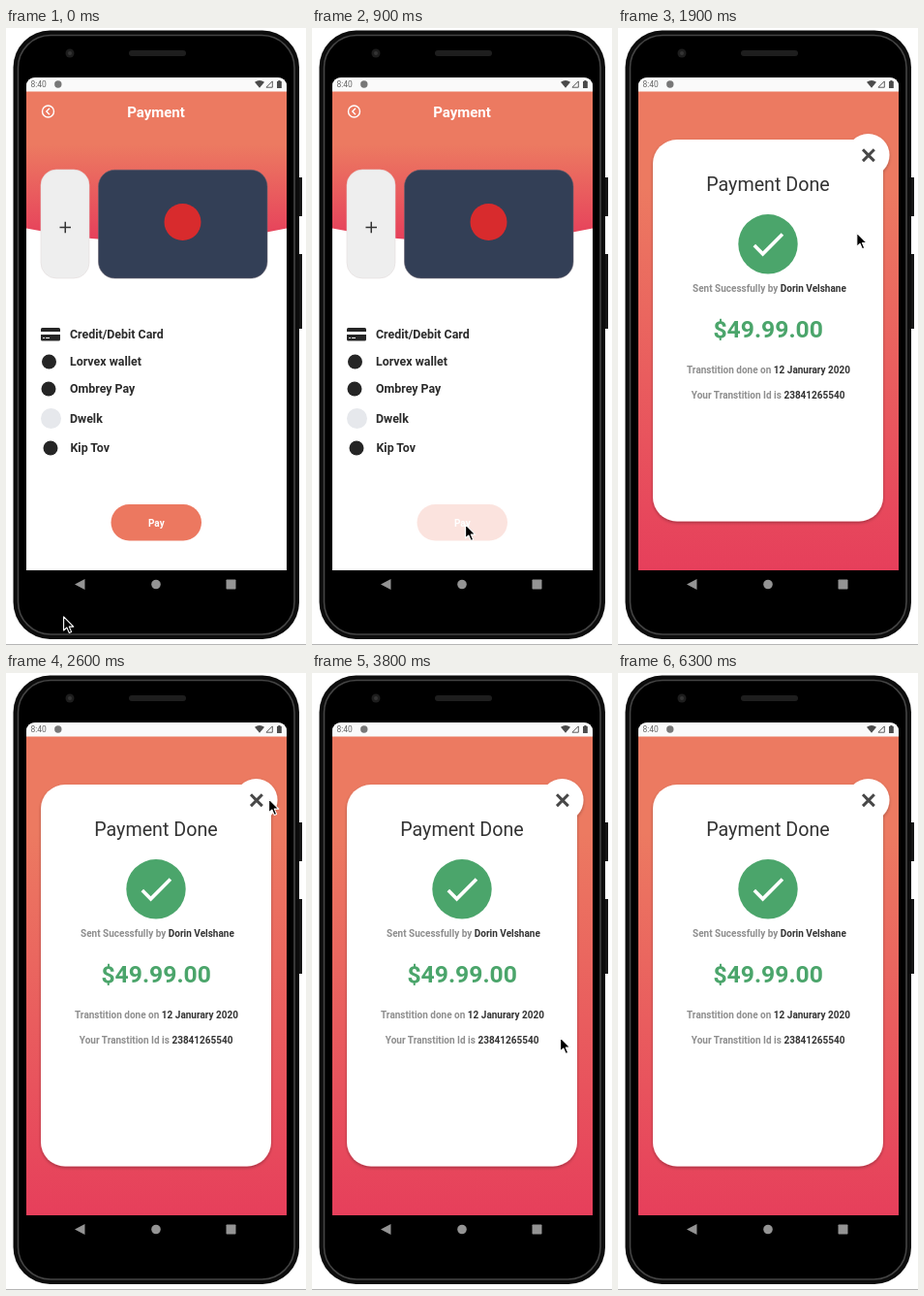
These frames come from a looping animation (310 px wide and 636 px high, 6400 ms). An HTML page:

```html
<!DOCTYPE html>
<html lang="en">
<head>
<meta charset="utf-8">
<title>Payment flow</title>
<style>
  html, body { margin: 0; width: 100%; height: 100%; overflow: hidden; background: #fff; }
  svg { display: block; width: 310px; height: 636px; }
  text { font-family: Roboto, sans-serif; font-weight: 700; fill: #2b2b2b; white-space: pre; }
  .mid { text-anchor: middle; }
  .method { font-size: 12.4px; }
  .note { font-size: 10px; fill: #8e8e8e; }
  .note tspan { fill: #333; }
</style>
</head>
<body>
<svg viewBox="0 0 310 636">
  <defs>
    <linearGradient id="header" x1="0" y1="65" x2="0" y2="219" gradientUnits="userSpaceOnUse">
      <stop offset=".36" stop-color="#ec7a61"/><stop offset="1" stop-color="#e63f5b"/>
    </linearGradient>
    <linearGradient id="backdrop" x1="0" y1="65" x2="0" y2="559" gradientUnits="userSpaceOnUse">
      <stop offset=".2" stop-color="#ec7a61"/><stop offset="1" stop-color="#e63f5b"/>
    </linearGradient>
    <clipPath id="screen"><path d="M21 559V61q0-10 10-10H280q10 0 10 10V559Z"/></clipPath>
    <filter id="shadow" x="-10%" y="-10%" width="120%" height="120%">
      <feDropShadow dx="0" dy="1.5" stdDeviation="1.5" flood-opacity=".3"/>
    </filter>
  </defs>

  <!-- phone -->
  <path d="M0 635.5H310" stroke="#b5b5b5"/>
  <path d="M302 154h4v40h-4zM302 233h4v77h-4z" fill="#161616"/>
  <rect x="7.5" y="2.500" width="295.500" height="627.500" rx="38" fill="#0c0c0c"/>
  <rect x="12.500" y="7.500" width="285.500" height="617.500" rx="33.500" fill="#000" stroke="#444" stroke-width="1.600"/>
  <circle cx="66" cy="26" r="4.5" fill="#1d1d1d"/><circle cx="66" cy="26" r="2" fill="#343434"/>
  <rect x="127" y="23" width="59" height="6" rx="3" fill="#1e1e1e"/>
  <g fill="#949494">
    <path d="M81.500 568v11l-10.500-5.500z"/><circle cx="155" cy="573.500" r="4.800"/>
    <rect x="227.500" y="568.500" width="10" height="10" rx=".8"/>
  </g>

  <g clip-path="url(#screen)">
    <rect x="21" y="51" width="269" height="508" fill="#fff"/>

    <g id="form">
      <path d="M21 65H290V206.500Q155.500 234.500 21 206.500Z" fill="url(#header)"/>
      <g fill="none" stroke="#fff" stroke-width="1.400">
        <circle cx="43.500" cy="86" r="6"/><path d="M45 82.800 41.800 86 45 89.200"/>
      </g>
      <text class="mid" x="155" y="92" style="font-size:15px;fill:#fff">Payment</text>
      <rect x="36" y="146" width="50" height="112" rx="16" fill="#eee" stroke="#e2dcdc" stroke-width=".6"/>
      <path d="M55.500 205.500h11.500M61.250 199.750v11.500" stroke="#333" stroke-width="1.500"/>
      <rect x="95.500" y="146.300" width="174.500" height="111.700" rx="17" fill="#333f56" stroke="#67606e" stroke-width=".6"/>
      <circle cx="182.500" cy="200" r="19" fill="#d82b2d"/>

      <g fill="#252525">
        <path d="M37.500 309h17q1.500 0 1.500 1.500v2.500H36v-2.500q0-1.500 1.500-1.500zM36 316h20v5q0 1.500-1.500 1.500h-17q-1.500 0-1.500-1.500z"/>
        <path d="M38 319.500h2m1 0h4" stroke="#fff"/>
        <circle cx="44.500" cy="344" r="7.500"/>
        <circle cx="44" cy="372" r="7.500"/>
        <circle cx="46.500" cy="402.500" r="10.500" fill="#e6e8ec"/>
        <circle cx="46" cy="433" r="7.500"/>
      </g>
      <g class="method">
        <text x="66" y="319.700">Credit/Debit Card</text>
        <text x="66" y="347.700">Lorvex wallet</text>
        <text x="66" y="376.200">Ombrey Pay</text>
        <text x="66" y="406.700">Dwelk</text>
        <text x="66.500" y="437.300">Kip Tov</text>
      </g>
      <g id="button">
        <rect x="108.500" y="491" width="93.500" height="37.500" rx="18.750" fill="#ec7860"/>
        <text class="mid" x="155.300" y="514" style="font-size:10px;fill:#fff">Pay</text>
      </g>
    </g>

    <g id="receipt">
      <rect x="21" y="65" width="269" height="494" fill="url(#backdrop)"/>
      <g filter="url(#shadow)" fill="#fff">
        <rect x="36" y="115" width="238" height="393.500" rx="25"/>
        <circle cx="258.500" cy="131" r="22"/>
      </g>
      <path d="M253 125.300 264.800 137.100M264.800 125.300 253 137.100" stroke="#484848" stroke-width="3"/>
      <text class="mid" x="155" y="168" style="font-size:19.700px;font-weight:400;fill:#333">Payment Done</text>
      <circle cx="155" cy="222.800" r="30.700" fill="#4ba56b"/>
      <path d="M9 16.170 4.830 12 3.410 13.410 9 19 21 7 19.590 5.590Z" transform="translate(133.400 201.200) scale(1.800)" fill="#fff"/>
      <text class="note" x="77" y="271.500">Sent Sucessfully by <tspan>Dorin Velshane</tspan></text>
      <text class="mid" x="155.200" y="319.300" style="font-size:24.700px;fill:#4ba56b">$49.99.00</text>
      <text class="note" x="71" y="356">Transtition done on <tspan>12 Janurary 2020</tspan></text>
      <text class="note" x="75.800" y="381.700">Your Transtition Id is <tspan>23841265540</tspan></text>
    </g>

    <!-- status bar -->
    <rect x="21" y="51" width="269" height="14.500" fill="#fafafa"/>
    <text x="25.500" y="61.300" style="font-size:8.500px;font-weight:400;fill:#666">8:40</text>
    <circle cx="53.800" cy="58" r="3.700" fill="#777"/>
    <g fill="#4a4a4a">
      <path d="M257 55.800q5-3.600 10 0l-5 5.900z"/>
      <path d="M269 61.200h6.300v-6.300z" fill="none" stroke="#4a4a4a" stroke-width=".9"/>
      <path d="M280 55h1.300v-1h2.200v1h1.300v7H280z"/>
    </g>
  </g>

  <path id="cursor" d="M.6 .8V15L3.900 12 6.200 17.400 8.600 16.400 6.300 11.100H10.800Z"
        fill="#000" stroke="#fff" stroke-width="1.100" stroke-linejoin="round"/>
</svg>
<script>
  const LOOP = 6400, TICK = 100;
  const DONE = 1000, HIDE = 5300;
  const PRESS = [750, 900];

  // time, x, y of the pointer tip
  const path = [
    [100, 59, 606], [800, 158, 511],
    [1400, 158, 511], [2100, 268, 136],
    [2300, 276, 132], [2500, 271, 129],
    [2900, 271, 129], [3600, 256, 375]
  ];

  const [form, receipt, button, cursor] =
    ['form', 'receipt', 'button', 'cursor'].map(id => document.getElementById(id));
  const clamp = v => Math.min(1, Math.max(0, v));
  const ease = v => v * v * (3 - 2 * v);
  const show = (el, on) => el.setAttribute('display', on ? 'inline' : 'none');

  function pointerAt(t) {
    let i = 0;
    while (i < path.length - 2 && t >= path[i + 1][0]) i++;
    const [t0, x0, y0] = path[i], [t1, x1, y1] = path[i + 1];
    const k = ease(clamp((t - t0) / (t1 - t0)));
    return [x0 + (x1 - x0) * k, y0 + (y1 - y0) * k];
  }

  function draw(t) {
    show(form, t < DONE);
    show(receipt, t >= DONE);
    show(cursor, t < HIDE);
    button.setAttribute('opacity', 1 - .8 * clamp((t - PRESS[0]) / (PRESS[1] - PRESS[0])));
    cursor.setAttribute('transform', `translate(${pointerAt(t)})`);
  }

  const start = performance.now();
  function loop() {
    const t = (performance.now() - start) % LOOP;
    draw(Math.floor(t / TICK) * TICK);
    requestAnimationFrame(loop);
  }
  loop();
</script>
</body>
</html>
```
